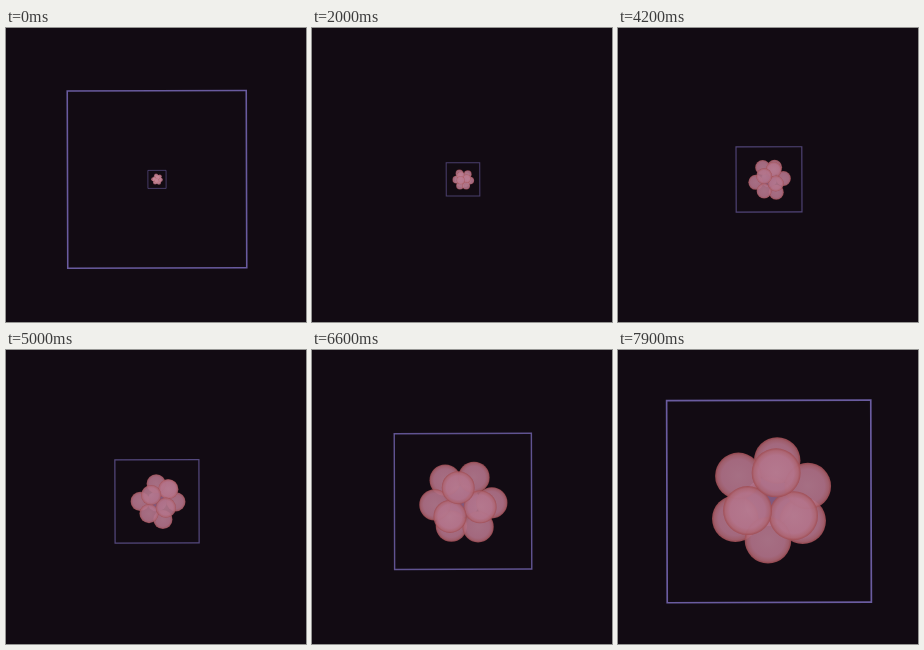
Animation of 300x294 px, one loop 8 s. Source, as an HTML page with a canvas:

```html
<!DOCTYPE html>
<html>
<head>
<meta charset="utf-8">
<style>
html, body { margin: 0; width: 100%; height: 100%; overflow: hidden; background: #120b13; }
canvas { display: block; }
</style>
</head>
<body>
<canvas id="stage" width="300" height="294"></canvas>
<script>
const ctx = document.getElementById('stage').getContext('2d');
const LOOP = 8000, STEP = 100, CX = 151, CY = 151.4;
const SPIN = 0.49; // rad/s before the first pose

// Sphere centres for a frame 200 units wide: outer ring of six, then the front three.
const poses = [
  { t: 3.4, at: [[6, -41], [42, -6], [29, 33], [-9, 41], [-38, 18], [-32, -24], [-14, -5], [4, -25], [20, 10]] },
  { t: 5.0, at: [[26, -30], [45, 1], [14, 43], [-19, 29], [-40, 0], [-2, -42], [-14, -15], [27, -29], [21, 15]] },
  { t: 6.6, at: [[42, 2], [22, 37], [-17, 36], [-41, 5], [-26, -31], [16, -35], [-7, -20], [25, 8], [-19, 22]] },
  { t: 7.9, at: [[33, 19], [-1, 38], [-33, 17], [-30, -25], [8, -40], [38, -15], [7, -28], [24, 14], [-21, 9]] }
];
const order = [0, 2, 4, 1, 3, 5, 7, 8, 6];

const mix = (a, b, k) => a + (b - a) * k;
const polar = ([x, y]) => ({ r: Math.hypot(x, y), a: Math.atan2(y, x) });

function spherePos(i, t) {
  const n = poses.findIndex(p => p.t >= t);
  if (n === 0) {
    const p = polar(poses[0].at[i]);
    return { r: p.r, a: p.a - SPIN * (poses[0].t - t) };
  }
  const from = poses[n - 1], to = poses[n];
  const k = (t - from.t) / (to.t - from.t);
  const p = polar(from.at[i]), q = polar(to.at[i]);
  const turn = Math.atan2(Math.sin(q.a - p.a), Math.cos(q.a - p.a));
  return { r: mix(p.r, q.r, k), a: p.a + turn * k };
}

function sphere(x, y, r) {
  const g = ctx.createRadialGradient(x, y, 0, x, y, r);
  g.addColorStop(0, '#b67a90');
  g.addColorStop(0.72, '#b3738a');
  g.addColorStop(0.9, '#ae6674');
  g.addColorStop(1, '#a04c52');
  ctx.fillStyle = g;
  ctx.beginPath();
  ctx.arc(x, y, r, 0, 7);
  ctx.fill();
}

function cluster(t, width) {
  const s = width / 200;
  ctx.globalAlpha = 1;
  ctx.fillStyle = '#80587e';
  ctx.beginPath();
  ctx.arc(CX, CY, 24 * s, 0, 7);
  ctx.fill();
  ctx.globalAlpha = 0.9;
  for (const i of order) {
    const p = spherePos(i, t);
    const r = (i > 5 ? 24 : 22.8) * s;
    sphere(CX + Math.cos(p.a) * p.r * s, CY + Math.sin(p.a) * p.r * s, r);
  }
  // Seen from afar the cluster is a brighter spot.
  const glow = Math.max(0, 0.5 - width / 90);
  if (glow) {
    ctx.globalAlpha = glow;
    ctx.fillStyle = '#f0b0b4';
    ctx.beginPath();
    ctx.arc(CX, CY, 50 * s, 0, 7);
    ctx.fill();
  }
  ctx.globalAlpha = 1;
}

function square(width) {
  const h = width * 0.99;
  ctx.save();
  ctx.translate(CX, CY);
  ctx.rotate(-0.003);
  ctx.globalAlpha = Math.min(1, 0.55 + width / 400);
  ctx.strokeStyle = '#6a5ca0';
  ctx.lineWidth = Math.min(1.7, 0.9 + width / 260);
  ctx.strokeRect(-width / 2, -h / 2, width, h);
  ctx.restore();
}

function draw(now) {
  const t = Math.floor((now % LOOP) / STEP) * STEP / 1000;
  ctx.fillStyle = '#120b13';
  ctx.fillRect(0, 0, 300, 294);
  const inner = 18.2 * Math.exp(0.306 * t);
  const outer = 179 * Math.exp(0.325 * t);
  if (outer < 320) square(outer);
  square(inner);
  cluster(t, inner);
}

const start = performance.now();
function frame() {
  draw(performance.now() - start);
  requestAnimationFrame(frame);
}
frame();
</script>
</body>
</html>
```
